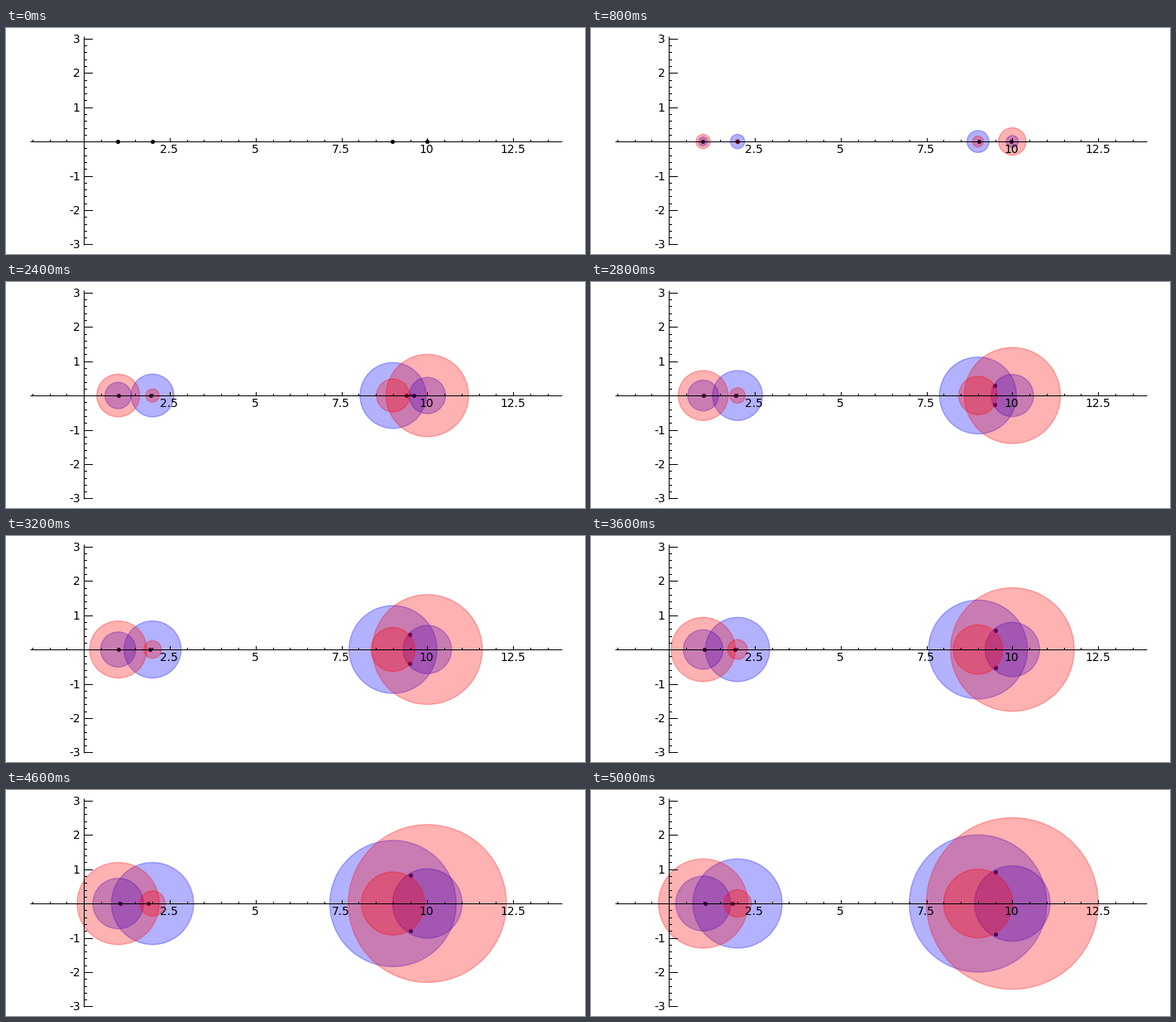
Recreate the animation shown at these times as a matplotlib script. Size 700x273 px, loop 5200 ms.

```python
import numpy as np
import matplotlib.pyplot as plt
from matplotlib.animation import FuncAnimation
from matplotlib.patches import Circle

W, H, DPI = 700, 273, 100
X0, Y0 = 94.1, 137.1    # origin in pixels from top left
UX, UY = 41.53, 41.44   # pixels per unit
STEPS = 25

CENTERS = (1, 2, 9, 10)
ROW_RADII = (1.3, 0.4, 1.0, 2.5)
COL_RADII = (0.8, 1.3, 2.0, 1.1)

plt.rcParams["font.family"] = "DejaVu Sans"
fig = plt.figure(figsize=(W / DPI, H / DPI), dpi=DPI, facecolor="white")
ax = fig.add_axes([0, 0, 1, 1])
ax.set_xlim(-X0 / UX, (W - X0) / UX)
ax.set_ylim((Y0 - H) / UY, Y0 / UY)
ax.axis("off")


def line(x, y, cap="projecting"):
    ax.plot(x, y, color="black", lw=0.72, solid_capstyle=cap,
            snap=True, zorder=5)


def x_tick(x, px):
    line([x, x], [0, px / UY])


def y_tick(y, px):
    line([0, px / UX], [y, y])


def label(x, y, value, ha):
    ax.text(x, y, f"{value:g}", fontsize=10, ha=ha, va="baseline", zorder=6)


def draw_axes():
    line([(29 - X0) / UX, (672 - X0) / UX], [0, 0], "butt")
    line([0, 0], [(Y0 - 262) / UY, (Y0 - 10) / UY], "butt")
    for x in np.arange(-1.5, 14, 0.5):
        x_tick(x, 2)
    for x in np.arange(2.5, 13, 2.5):
        x_tick(x, 4)
        label(x - 0.7 / UX, -13.9 / UY, x, "center")
    for i in range(-15, 16):
        y_tick(i / 5, 3)
    for y in (-3, -2, -1, 1, 2, 3):
        y_tick(y, 10)
        label(-4.4 / UX, y - 5.03 / UY, y, "right")


def add_discs(color, radii):
    discs = []
    for c, r in zip(CENTERS, radii):
        disc = Circle((c, 0), 0, facecolor=color, edgecolor=color,
                      alpha=0.3, lw=1, zorder=3)
        ax.add_patch(disc)
        discs.append((disc, r))
    return discs


def eigenvalues(t):
    """Two slowly shifting real values and a pair that meets, then splits."""
    s = t * t
    mid = 9.5 + 0.02 * s
    half = np.sqrt(complex(0.25 - 1.02 * s - 0.04 * s * s))
    return np.array([1 + 0.08 * s, 2 - 0.133 * s, mid - half, mid + half])


draw_axes()
discs = add_discs("blue", COL_RADII) + add_discs("red", ROW_RADII)
dots = ax.scatter(CENTERS, [0] * 4, s=10, color="black", lw=0.5, zorder=2)


def update(k):
    t = k / STEPS
    for disc, r in discs:
        disc.set_radius(r * t)
        disc.set_visible(k > 0)
    z = eigenvalues(t)
    # half a pixel up and left, so dots settle on the lower whole pixel
    dots.set_offsets(np.column_stack([z.real - 0.5 / UX, z.imag + 0.5 / UY]))
    return [dots] + [d for d, _ in discs]


anim = FuncAnimation(fig, update, frames=STEPS + 1, interval=200,
                     repeat=True, repeat_delay=0, blit=False)
plt.show()
```
